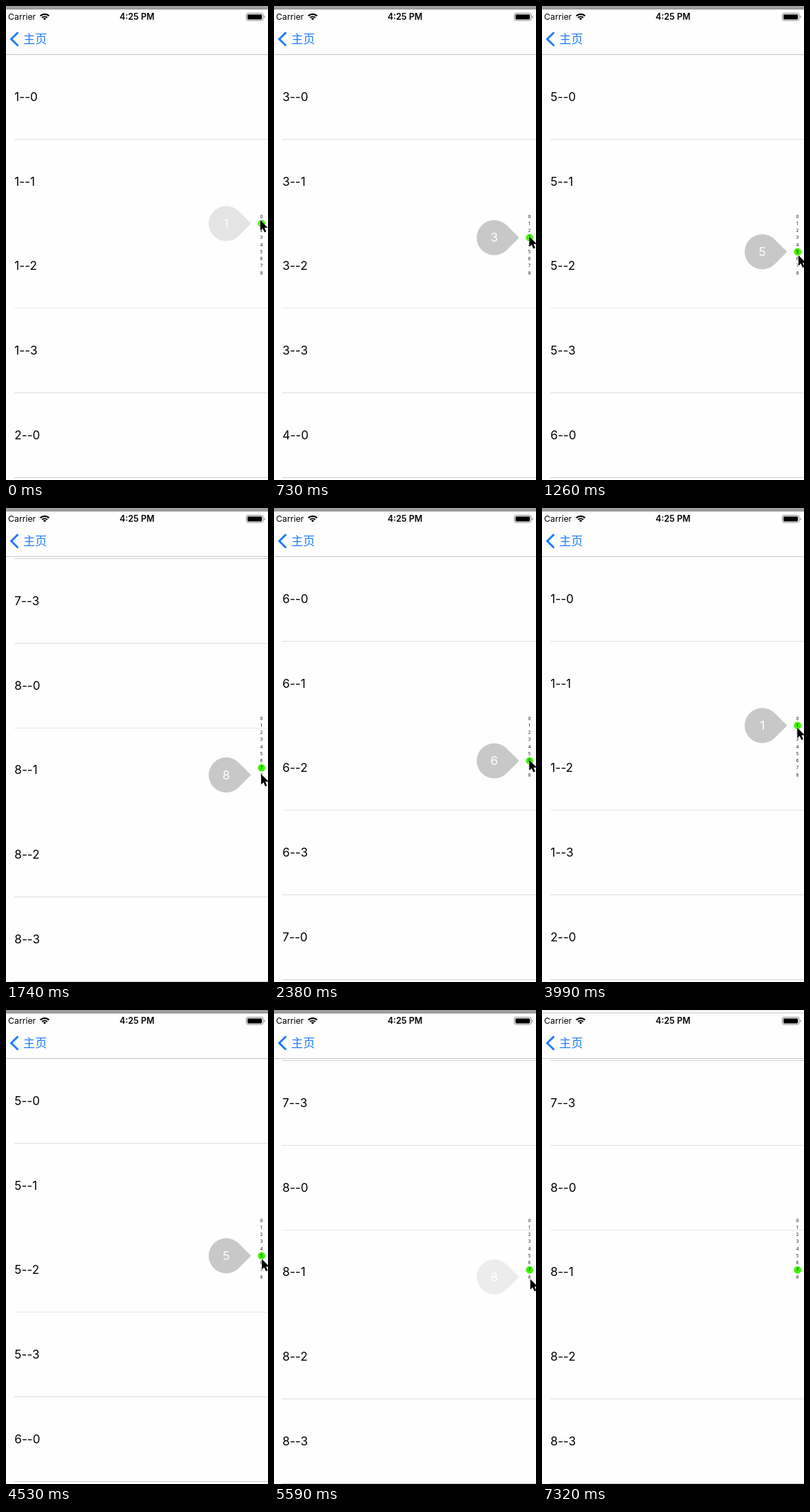
These frames come from a looping animation (380x688 px, 7420 ms). An HTML page:

```html
<!DOCTYPE html>
<html lang="zh">
<head>
<meta charset="utf-8">
<title>Section index</title>
<style>
  html, body { margin: 0; width: 100%; height: 100%; overflow: hidden; background: #fefefe; }
  svg { display: block; width: 380px; height: 688px; font-family: Inter, Roboto, sans-serif; }
  #rows { font-size: 17.2px; font-feature-settings: "calt" 0; }
  #index { font-size: 5.6px; text-anchor: middle; }
</style>
</head>
<body>
<svg viewBox="0 0 380 688">
  <rect width="380" height="688" fill="#fefefe"/>
  <g id="lines"></g>
  <g id="rows"></g>

  <rect id="strip" width="380" height="5"/>
  <rect id="edge" y="4" width="380" height="1"/>
  <rect y="70" width="380" height="1" fill="#c4c4c4"/>
  <text x="3" y="20" font-size="12.3">Carrier</text>
  <text x="190" y="20" font-size="12.5" font-weight="600" text-anchor="middle">4:25 PM</text>
  <g fill="none" stroke="#000" stroke-width="2.2">
    <path d="M49.8 14.4a9 9 0 0 1 12.6 0M52.3 17a5.5 5.5 0 0 1 7.6 0"/>
    <path d="M56.1 20.6l-2.1-2.2a3 3 0 0 1 4.2 0z" fill="#000" stroke="none"/>
  </g>
  <rect x="348.5" y="10.5" width="24.5" height="10.5" rx="2.6" fill="none" stroke="#888"/>
  <rect x="350.2" y="12.2" width="21" height="7.2" rx="1.3"/>
  <path d="M374.3 14a2 2 0 0 1 0 3.8z" fill="#888"/>
  <path d="M17.5 38.3L7.6 48l9.9 9.7" fill="none" stroke="#217cfb" stroke-width="3"/>
  <text x="25" y="54.3" font-size="17.2" fill="#217cfb" style="font-family:'Noto Sans CJK SC','Noto Sans CJK',sans-serif">主页</text>

  <circle id="dot" cx="370.7" r="5.4" fill="#40f500"/>
  <g id="index"></g>
  <g id="bubble">
    <path d="M18 -18A25.5 25.5 0 1 0 18 18L36 0z" fill="#c8c8c8"/>
    <text id="digit" y="6.2" font-size="17.5" fill="#fff" text-anchor="middle"></text>
  </g>
  <path id="cursor" d="M0 0V15.2L3.5 12L6 17.8L8.6 16.7L6.1 11H10.9z" stroke="#fff" stroke-width="1" paint-order="stroke"/>
</svg>
<script>
const LOOP = 7420, ROW = 122.8, PITCH = 10.25;
const el = id => document.getElementById(id);

function add(parent, tag, attrs) {
  const node = document.createElementNS('http://www.w3.org/2000/svg', tag);
  for (const k in attrs) node.setAttribute(k, attrs[k]);
  return el(parent).appendChild(node);
}

for (let i = 0; i < 9; i++)
  add('index', 'text', { x: 370.5, y: 307.6 + i * PITCH }).textContent = i;

const rows = Array.from({ length: 5 }, (_, i) =>
  add('rows', 'text', { x: 12.3, y: 137.8 + i * ROW }));

// Each separator: y and colour; one hairline is lost in each layout
const topLines = [[193, '#dfdfdf'], [438, '#e7e7e7'], [561, '#dcdcdc'], [684, '#cfcfcf']];
const endLines = [[73, '#cfcfcf'], [196, '#dfdfdf'], [319, '#e7e7e7'], [564, '#dcdcdc'], [687, '#cfcfcf']];
const lines = endLines.map(() => add('lines', 'rect', { x: 12, width: 368, height: 1 }));

// Pointer path: time, x, y
const path = [
  [0, 368.8, 310.8], [280, 368.8, 311], [1260, 372, 361.8], [1740, 370, 386.2],
  [1800, 370, 387], [2070, 370, 387], [2380, 370.3, 365.8], [3210, 370, 308.2],
  [3400, 370, 303], [3790, 370, 303], [4530, 371, 361.3], [4910, 371.7, 390.5],
  [6690, 371.7, 390.5]
];

function pointer(t) {
  if (t > 6690) {
    const p = Math.min(1, (t - 6690) / 380);
    return [371.7 - 24 * p, 390.5 + 300 * p ** 1.4];
  }
  const i = Math.max(1, path.findIndex(k => k[0] >= t));
  const [t0, x0, y0] = path[i - 1], [t1, x1, y1] = path[i];
  const p = Math.max(0, (t - t0) / (t1 - t0));
  return [x0 + (x1 - x0) * p, y0 + (y1 - y0) * p];
}

function bubbleAlpha(t) {
  if (t < 140) return 0.47 + 0.53 * t / 140;
  if (t < 5430) return 1;
  return t < 7320 ? 1 - 0.68 * Math.min(1, (t - 5430) / 160) : 0;
}

function draw(t) {
  const [x, y] = pointer(t);
  // The list follows the pointer slightly late
  const touchY = pointer(Math.min(t - 40, 6690))[1];
  const section = Math.max(0, Math.min(8, Math.floor((touchY - 300.4) / PITCH)));
  const atEnd = section === 8, first = atEnd ? 31 : section * 4, done = t >= 7320;

  rows.forEach((row, i) => {
    const cell = first + i;
    row.textContent = `${cell >> 2}--${cell % 4}`;
  });
  el('rows').setAttribute('transform', `translate(0 ${atEnd ? 3 : 0})`);
  lines.forEach((line, i) => {
    const [ly, fill] = (atEnd ? endLines : topLines)[i] || [-9, 'none'];
    line.setAttribute('y', ly);
    line.setAttribute('fill', fill);
  });

  el('dot').setAttribute('cy', 305.5 + Math.min(section, 7) * PITCH);
  el('bubble').setAttribute('transform', `translate(319.5 ${305.5 + section * PITCH})`);
  el('bubble').setAttribute('opacity', bubbleAlpha(t));
  el('digit').textContent = section;
  el('cursor').setAttribute('transform', `translate(${x} ${y})`);
  el('cursor').setAttribute('opacity', t < 7070 ? 1 : 0);
  el('strip').setAttribute('fill', done ? '#f4f4f4' : '#a09e9f');
  el('edge').setAttribute('fill', done ? '#cfcfcf' : '#8d8b8c');
}

const start = performance.now();
function tick() {
  draw((performance.now() - start) % LOOP);
  requestAnimationFrame(tick);
}
tick();
</script>
</body>
</html>
```
